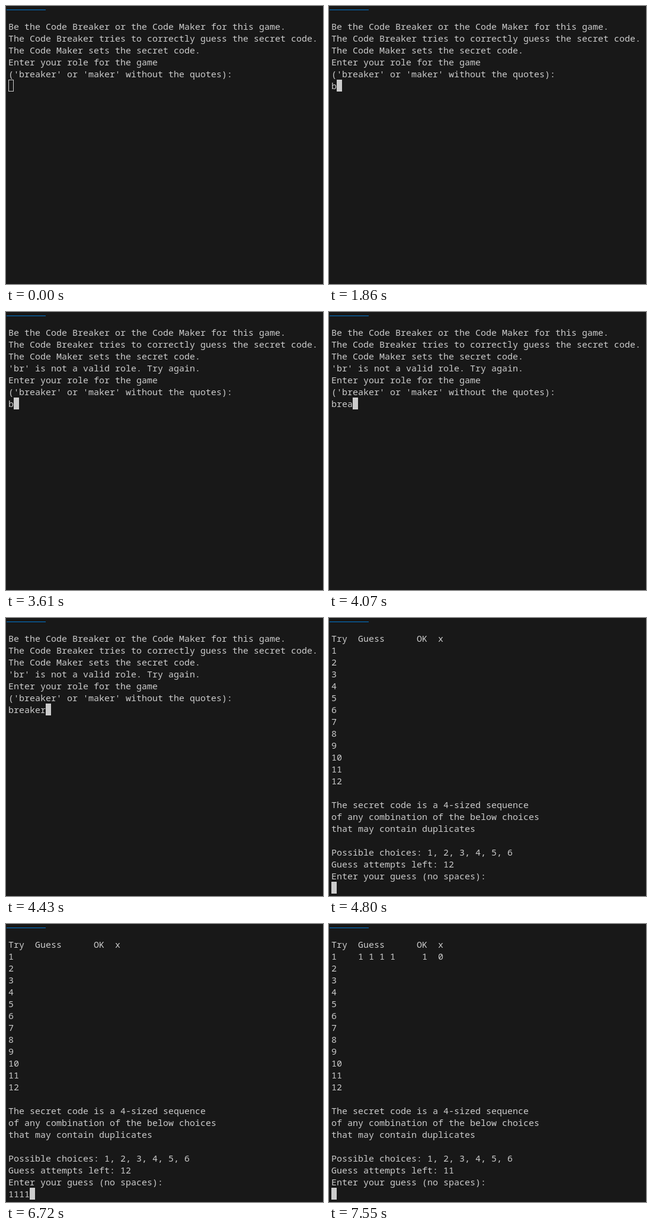
An HTML page that plays this animation: 535x468 px, repeating every 8000 ms.

```html
<!DOCTYPE html>
<html lang="en">
<head>
<meta charset="utf-8">
<title>Code game terminal</title>
<style>
  html, body { margin: 0; width: 100%; height: 100%; overflow: hidden; background: #181818; }
  #stage { position: relative; width: 535px; height: 468px; overflow: hidden; background: #181818; }
  #tab { position: absolute; left: 1px; top: 6px; width: 66px; height: 1px; background: #0078d4; }
  #text {
    position: absolute; left: 4px; top: 24px; margin: 0;
    font: 15px/20px "Noto Sans Mono", "DejaVu Sans Mono", monospace;
    color: #ccc; white-space: pre;
  }
  #cursor {
    position: absolute; width: 9px; height: 20px; box-sizing: border-box;
    border: 1px solid #ccc; background: #ccc;
  }
  #cursor.hollow { background: none; }
</style>
</head>
<body>
<div id="stage">
  <div id="tab"></div>
  <pre id="text"></pre>
  <div id="cursor"></div>
</div>
<script>
const LOOP = 8000, CELL = 9, ROW = 20, LEFT = 4, TOP = 24;
const textEl = document.getElementById('text');
const cursorEl = document.getElementById('cursor');

const intro = [
  'Be the Code Breaker or the Code Maker for this game.',
  'The Code Breaker tries to correctly guess the secret code.',
  'The Code Maker sets the secret code.'
];
const question = [
  'Enter your role for the game',
  "('breaker' or 'maker' without the quotes):"
];
const firstAsk = [...intro, ...question];
const secondAsk = [...intro, "'br' is not a valid role. Try again.", ...question];

function board(firstRow, left) {
  const tries = Array.from({ length: 12 }, (_, i) => String(i + 1));
  tries[0] = firstRow;
  return [
    'Try  Guess      OK  x', ...tries, '',
    'The secret code is a 4-sized sequence',
    'of any combination of the below choices',
    'that may contain duplicates', '',
    'Possible choices: 1, 2, 3, 4, 5, 6',
    'Guess attempts left: ' + left,
    'Enter your guess (no spaces):'
  ];
}

// Each scene: start time, printed lines, typed input, key times, time of Enter
const scenes = [
  { at: 0, lines: firstAsk, input: 'br', keys: [1860, 2040] },
  { at: 2220, lines: secondAsk, input: 'breaker',
    keys: [3610, 3890, 3980, 4070, 4160, 4340, 4430] },
  { at: 4800, lines: board('1', 12), input: '1111',
    keys: [6180, 6360, 6540, 6720], enter: 7460 },
  { at: 7550, lines: board('1    1 1 1 1     1  0', 11), input: '', keys: [] }
];

let shown = '';

function draw(t) {
  const scene = scenes.filter(s => t >= s.at).pop();
  const typed = scene.input.slice(0, scene.keys.filter(k => t >= k).length);
  const entered = t >= (scene.enter ?? LOOP);
  const col = entered ? 0 : typed.length;
  const row = scene.lines.length + (entered ? 1 : 0);
  const text = [...scene.lines, typed].join('\n');
  if (text !== shown) textEl.textContent = shown = text;
  cursorEl.style.left = LEFT + col * CELL + 'px';
  cursorEl.style.top = TOP + row * ROW + 'px';
  cursorEl.className = t < 540 ? 'hollow' : '';
}

let start = null;
function tick(now) {
  start ??= now;
  draw((now - start) % LOOP);
  requestAnimationFrame(tick);
}
draw(0);
requestAnimationFrame(tick);
</script>
</body>
</html>
```
